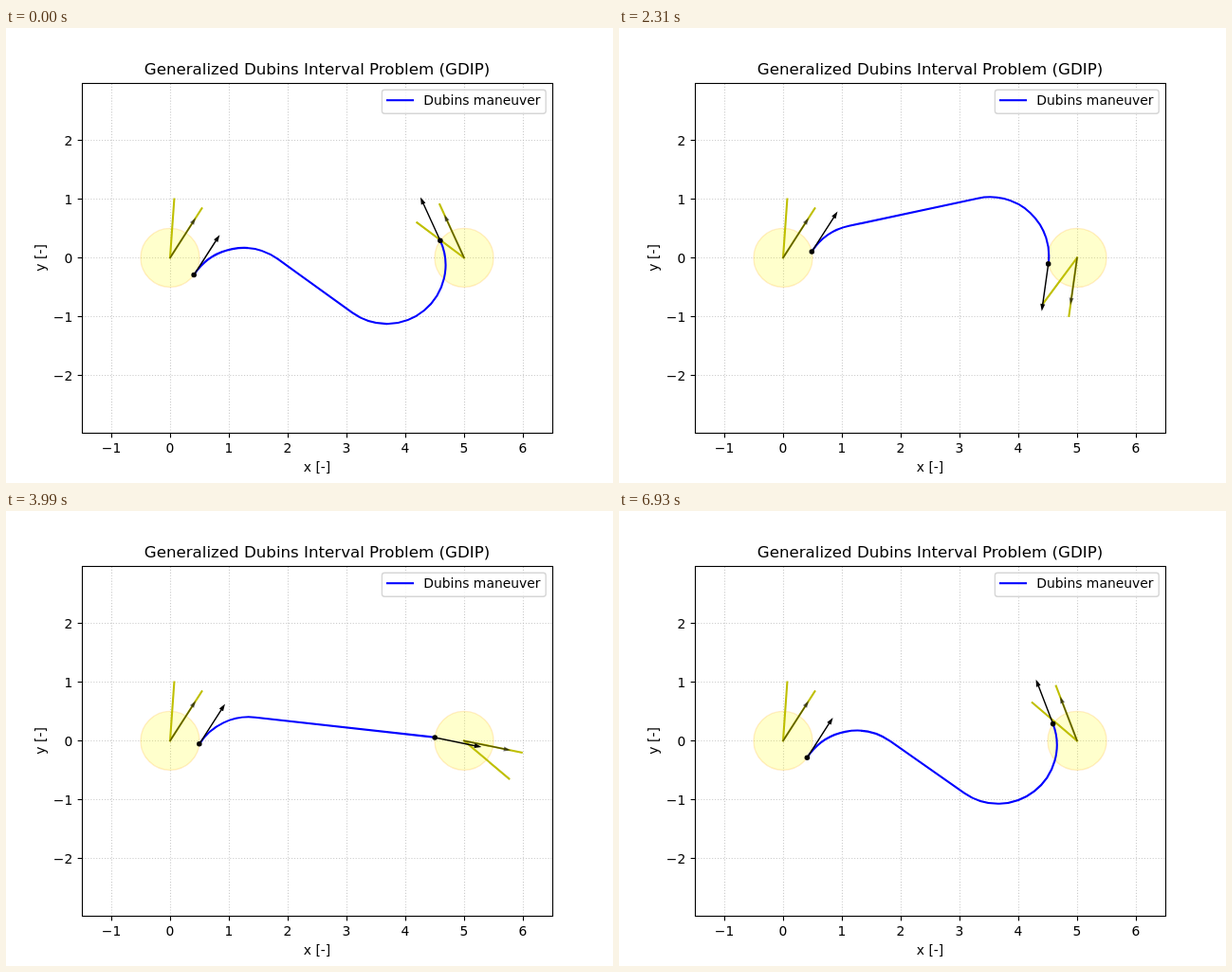
These frames come from a looping animation (640 px wide and 480 px high, 7 s). An HTML page:

```html
<!DOCTYPE html>
<html lang="en">
<head>
<meta charset="utf-8">
<title>Generalized Dubins Interval Problem</title>
<style>
  html, body { margin: 0; width: 100%; height: 100%; overflow: hidden; background: #fff; }
  svg { display: block; width: 640px; height: 480px; }
  text { font: 13.89px "DejaVu Sans", sans-serif; fill: #000; }
  .title { font-size: 16.67px; }
  .mid { text-anchor: middle; }
  .end { text-anchor: end; }
  .grid { stroke: #b0b0b0; stroke-opacity: .65; stroke-width: 1.11; stroke-dasharray: 1.11 1.83; }
  .tick, .frame { stroke: #000; stroke-width: 1.11; fill: none; }
  .disk { fill: #ff0; fill-opacity: .2; stroke: #ffa500; stroke-opacity: .2; stroke-width: 1.39; }
  .limit { stroke: #bfbf00; stroke-width: 2.08; stroke-linecap: square; fill: none; }
  .arrow { stroke: #000; stroke-width: 1.39; stroke-linejoin: miter; stroke-miterlimit: 10; }
  .faint { fill-opacity: .5; stroke-opacity: .5; }
  .path { stroke: #00f; stroke-width: 2.08; stroke-linecap: square; stroke-linejoin: round; fill: none; }
  .legend { fill: #fff; fill-opacity: .8; stroke: #ccc; stroke-opacity: .8; stroke-width: 1.39; }
</style>
</head>
<body>
<svg id="plot" viewBox="0 0 640 480"></svg>
<script>
const svg = document.getElementById("plot");
const UNIT = 62, TAU = 2 * Math.PI;
const LOOP = 7000, STEPS = 100;
const DISK = 0.5, SPAN = 0.5;
const START = [0, 0], GOAL = [5, 0];
const START_ANGLE = 1, GOAL_ANGLE = 2;

const px = x => 173 + UNIT * x;
const py = y => 242.4 - UNIT * y;
const at = ([x, y]) => px(x).toFixed(2) + " " + py(y).toFixed(2);
const dir = a => [Math.cos(a), Math.sin(a)];
const move = (p, a, r) => [p[0] + r * Math.cos(a), p[1] + r * Math.sin(a)];

// Angle in [0, TAU), with rounding near a full turn taken as zero
function wrap(a) {
  const w = ((a % TAU) + TAU) % TAU;
  return w > TAU - 1e-9 ? 0 : w;
}

function add(tag, attrs, text) {
  const el = document.createElementNS("http://www.w3.org/2000/svg", tag);
  for (const k in attrs) el.setAttribute(k, attrs[k]);
  if (text) el.textContent = text;
  svg.appendChild(el);
  return el;
}

const shape = (cls, d = "") => add("path", { class: cls, d });
const label = (x, y, text, cls) => add("text", { x, y, class: cls }, text);
const signed = n => String(n).replace("-", "\u2212");

// Thin shaft with a triangular head, in plot units
function arrowPath(p, a) {
  const [c, s] = dir(a);
  const pts = [[0, .0005], [.7, .0005], [.7, .025], [.775, 0], [.7, -.025], [.7, -.0005], [0, -.0005]];
  return "M" + pts.map(([u, v]) => at([p[0] + u * c - v * s, p[1] + u * s + v * c])).join("L") + "Z";
}

const limitPath = (c, a) =>
  `M${at(move(c, a, 1))}L${at(c)}M${at(c)}L${at(move(c, a + SPAN, 1))}`;

// Centre of the unit turning circle; side is 1 for left, -1 for right
const turnCentre = (p, a, side) => move(p, a + side * Math.PI / 2, 1);

function between(p, q) {
  return { d: Math.hypot(q[0] - p[0], q[1] - p[1]), a: Math.atan2(q[1] - p[1], q[0] - p[0]) };
}

// Turn, straight, turn between the disk centres
function maneuver(a, b, s1, s2) {
  const { d, a: base } = between(turnCentre(START, a, s1), turnCentre(GOAL, b, s2));
  const off = (s2 - s1) / d;
  if (Math.abs(off) > 1) return null;
  const phi = base - Math.asin(off);
  const t1 = wrap(s1 * (phi - a)), t2 = wrap(s2 * (b - phi));
  const run = d * Math.cos(base - phi);
  return { a, b, s1, s2, phi, t1, t2, run, cost: t1 + run + t2 };
}

// Shortest maneuver over both heading intervals
function solve(lo) {
  let best = null;
  for (const a of [START_ANGLE, START_ANGLE + SPAN])
    for (const s1 of [-1, 1]) {
      const ends = [lo, lo + SPAN];
      const { d, a: base } = between(turnCentre(START, a, s1), GOAL);
      const direct = base + Math.asin(s1 / d);
      if (wrap(direct - lo) < SPAN) ends.push(direct);
      for (const b of ends)
        for (const s2 of [-1, 1]) {
          const m = maneuver(a, b, s1, s2);
          if (m && (!best || m.cost < best.cost)) best = m;
        }
    }
  // Both ends slide along the straight part to the rims of their disks
  best.from = move(START, best.phi, DISK);
  best.to = move(GOAL, best.phi, -DISK);
  return best;
}

function arc(turn, side, end) {
  if (turn < 1e-6) return "";
  return `A${UNIT} ${UNIT} 0 ${turn > Math.PI ? 1 : 0} ${side < 0 ? 1 : 0} ${at(end)}`;
}

function curve(m) {
  const p1 = move(turnCentre(m.from, m.a, m.s1), m.phi - m.s1 * Math.PI / 2, 1);
  const p2 = move(p1, m.phi, m.run - 2 * DISK);
  return `M${at(m.from)}${arc(m.t1, m.s1, p1)}L${at(p2)}${arc(m.t2, m.s2, m.to)}`;
}

for (let x = -1; x <= 6; x++) {
  const X = px(x) + .5;
  shape("grid", `M${X} 427.5V58`);
  shape("tick", `M${X} 427.5v4.86`);
  label(px(x), 448, signed(x), "mid");
}
for (let y = -2; y <= 2; y++) {
  const Y = py(y) + .1;
  shape("grid", `M80.5 ${Y}H576`);
  shape("tick", `M80.5 ${Y}h-4.86`);
  label(70.3, Y + 5, signed(y), "end");
}

for (const c of [START, GOAL])
  add("circle", { class: "disk", cx: px(c[0]), cy: py(c[1]), r: DISK * UNIT });
shape("limit", limitPath(START, START_ANGLE));
const goalLimit = shape("limit");
const startHint = shape("arrow faint"), goalHint = shape("arrow faint");
const path = shape("path");
const startArrow = shape("arrow"), goalArrow = shape("arrow");
const dots = [0, 1].map(() => add("circle", { r: 2.78 }));

add("rect", { class: "frame", x: 80.5, y: 58.5, width: 496, height: 369 });
label(328, 49, "Generalized Dubins Interval Problem (GDIP)", "mid title");
label(328, 468, "x [-]", "mid");
add("text", { class: "mid", transform: "translate(41 242.4) rotate(-90)" }, "y [-]");
add("rect", { class: "legend", x: 396.4, y: 65.2, width: 172.8, height: 25, rx: 2.78 });
shape("path", "M402 76.2H429");
label(440.3, 81, "Dubins maneuver", "");

function draw(ms) {
  const step = Math.floor((ms % LOOP) / (LOOP / STEPS));
  const lo = GOAL_ANGLE + TAU * step / STEPS;
  const m = solve(lo);
  const set = (el, d) => el.setAttribute("d", d);
  set(goalLimit, limitPath(GOAL, lo));
  set(startHint, arrowPath(START, m.a));
  set(goalHint, arrowPath(GOAL, m.b));
  set(path, curve(m));
  set(startArrow, arrowPath(m.from, m.a));
  set(goalArrow, arrowPath(m.to, m.b));
  [m.from, m.to].forEach((p, i) => {
    dots[i].setAttribute("cx", px(p[0]));
    dots[i].setAttribute("cy", py(p[1]));
  });
}

function tick() {
  draw(performance.now());
  requestAnimationFrame(tick);
}
tick();
</script>
</body>
</html>
```
